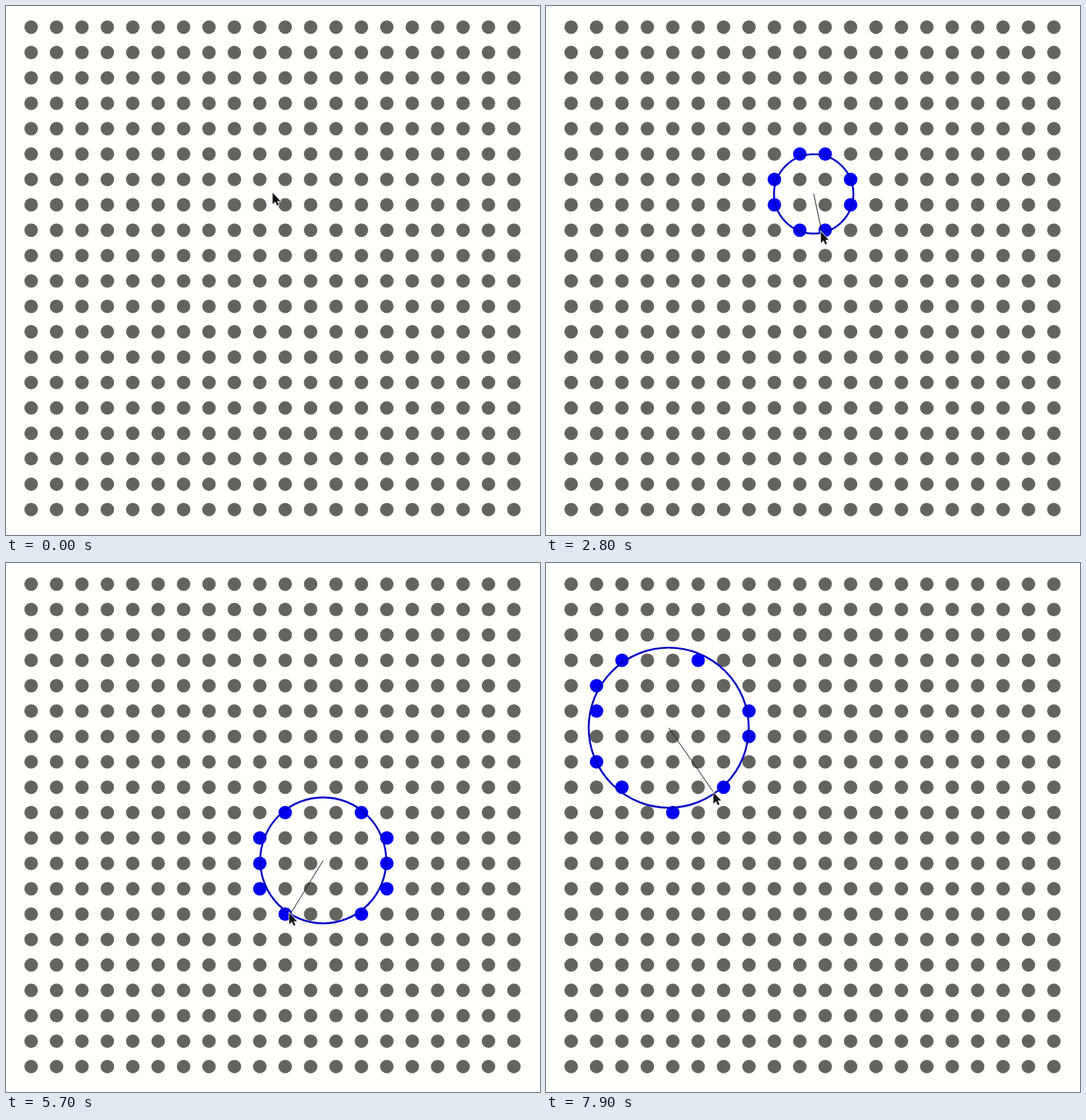
Animation of 752x745 px, one loop 8 s. Source, as an HTML page with a canvas:

```html
<!DOCTYPE html>
<html lang="en">
<head>
<meta charset="utf-8">
<title>Circle on a dot grid</title>
<style>
html, body { margin: 0; width: 100%; height: 100%; overflow: hidden; background: #fffffb; }
canvas { display: block; }
</style>
</head>
<body>
<canvas id="stage" width="752" height="745"></canvas>
<script>
const ctx = document.getElementById('stage').getContext('2d');
const LOOP = 8000, STEP = 100, COUNT = 20, DOT = 9.5, BAND = 5.5;
const PAPER = '#fffffb', GREY = '#63645f', BLUE = '#0000f2', RING = '#0000c8', RED = '#c02848', INK = '#111';

// grow: [time, radius]; angle is measured from straight down and bends with the radius
const DRAGS = [
  { x: 377, y: 264.6, angle: 0.21, bend: 0, grow: [[1000, 0], [2000, 47.2], [2900, 57]],
    release: 3600, fit: 56.1, leave: 3900 },
  { x: 446.7, y: 418.8, angle: -0.209, bend: -0.00384, grow: [[5100, 1], [5700, 88.7], [5800, 100]],
    release: 6300, fit: 96.6, leave: 6400 },
  { x: 172.8, y: 232, angle: 0.608, bend: 0, grow: [[7275, 0], [7900, 112.7]],
    release: LOOP, leave: LOOP }
];

const mix = (a, b, u) => a + (b - a) * u;
const startOf = drag => drag.grow[0][0];

function radiusAt({ grow }, t) {
  const i = grow.findIndex(key => key[0] > t);
  if (i === 0) return 0;
  if (i < 0) return grow[grow.length - 1][1];
  const [t0, r0] = grow[i - 1], [t1, r1] = grow[i];
  return mix(r0, r1, (t - t0) / (t1 - t0));
}

function rim(d, r) {
  const a = d.angle + d.bend * r;
  return [d.x + Math.sin(a) * r, d.y + Math.cos(a) * r];
}

// The hand follows the rim while dragging, then glides to the next centre.
function handAt(t, index) {
  const d = DRAGS[Math.max(index, 0)], from = rim(d, radiusAt(d, t));
  if (t <= d.leave) return from;
  const next = DRAGS[index + 1];
  const u = ((t - d.leave) / (startOf(next) - d.leave)) ** 0.78;
  return [mix(from[0], next.x, u), mix(from[1], next.y, u)];
}

function ring(x, y, r, color, width) {
  ctx.beginPath();
  ctx.arc(x, y, r, 0, Math.PI * 2);
  ctx.strokeStyle = color;
  ctx.lineWidth = width;
  ctx.stroke();
}

function drawGrid(d, r) {
  for (let row = 0; row < COUNT; row++) {
    for (let col = 0; col < COUNT; col++) {
      const x = 35.1 + col * 35.78, y = 29.4 + row * 35.76;
      const hit = r > DOT && Math.abs(Math.hypot(x - d.x, y - d.y) - r) <= DOT;
      ctx.fillStyle = hit ? BLUE : GREY;
      ctx.beginPath();
      ctx.arc(x + 0.3, y + 0.3, DOT, 0, Math.PI * 2);
      ctx.fill();
    }
  }
}

function drawCircle(d, r, t) {
  if (t >= d.release) {
    ring(d.x, d.y, d.fit, RING, 2.6);
    ring(d.x, d.y, d.fit - BAND, RED, 1);
    ring(d.x, d.y, d.fit + BAND, RED, 1);
    return;
  }
  ring(d.x, d.y, r, RING, 2.6);
  ctx.beginPath();
  ctx.moveTo(d.x, d.y);
  ctx.lineTo(...rim(d, r));
  ctx.strokeStyle = INK;
  ctx.lineWidth = 1;
  ctx.stroke();
}

const arrow = new Path2D('M0 0V16L3.7 12.5L6.2 18L8.6 17L6.2 11.7H11Z');

function drawPointer([x, y]) {
  ctx.save();
  ctx.translate(x - 1.5, y - 1.6);
  ctx.strokeStyle = '#fff';
  ctx.lineWidth = 1.6;
  ctx.stroke(arrow);
  ctx.fillStyle = INK;
  ctx.fill(arrow);
  ctx.restore();
}

function frame() {
  const t = Math.floor(performance.now() % LOOP / STEP) * STEP;
  const index = DRAGS.filter(d => startOf(d) <= t).length - 1;
  const drag = DRAGS[index];
  const r = drag ? radiusAt(drag, t) : 0;
  ctx.fillStyle = PAPER;
  ctx.fillRect(0, 0, 752, 745);
  drawGrid(drag, r);
  if (r > 0) drawCircle(drag, r, t);
  drawPointer(handAt(t, index));
  requestAnimationFrame(frame);
}
frame();
</script>
</body>
</html>
```
